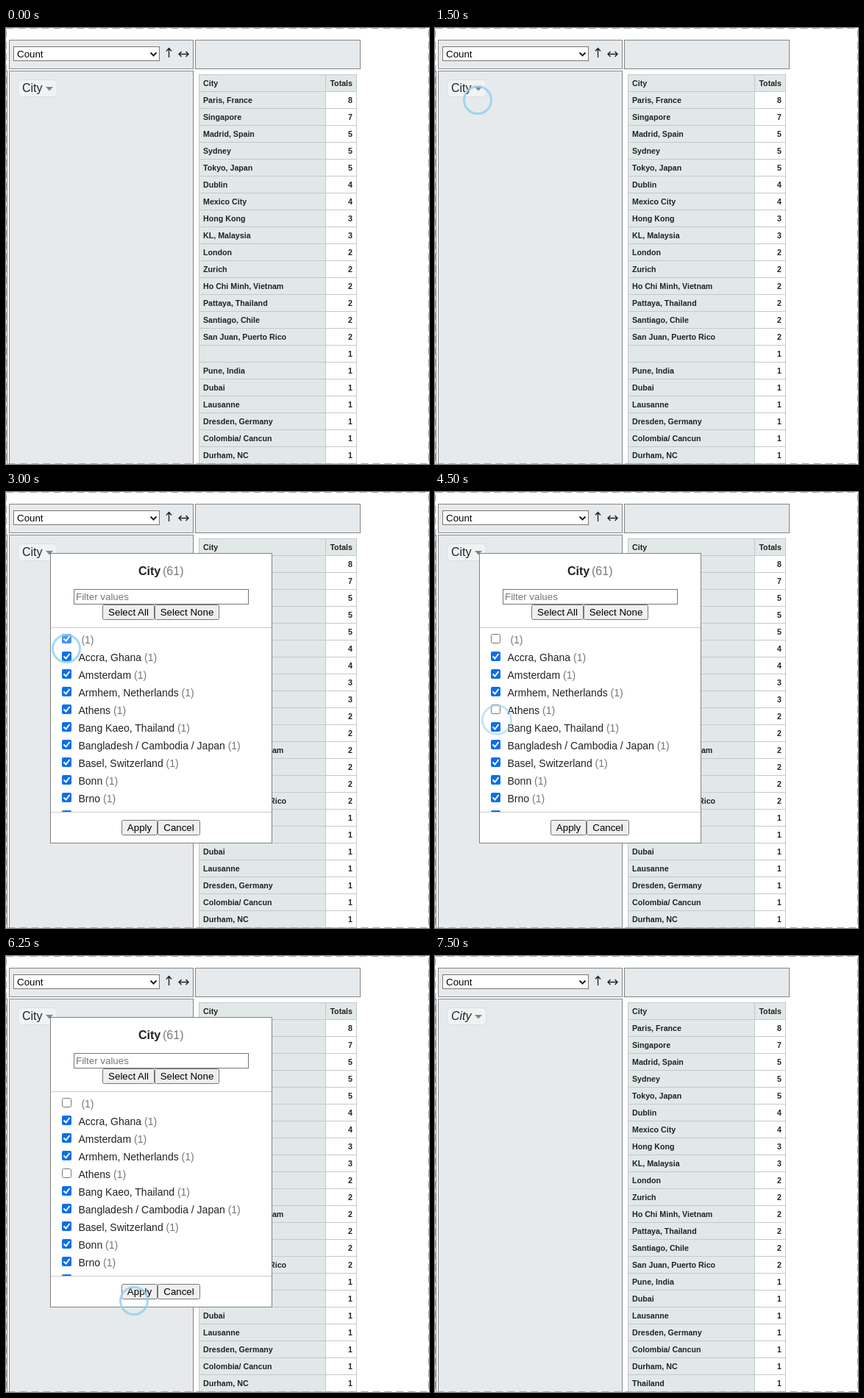
An HTML page for the animation above (8500 ms loop, 575 by 593 pixels).

```html
<!DOCTYPE html>
<html lang="en">
<head>
<meta charset="utf-8">
<title>Filtering a pivot table</title>
<style>
  html, body { margin: 0; width: 100%; height: 100%; overflow: hidden; background: #fff; }
  svg { display: block; font: 14px "Liberation Sans", Arial, sans-serif; }
  text { white-space: pre; fill: #222; }
  .cell { fill: #e6eaec; stroke: #858585; }
  .table text { font-size: 10.667px; font-weight: bold; }
  .ui { font-size: 13.333px; fill: #000; }
  .big { font-size: 16px; }
  .dim { fill: #777; }
  .end { text-anchor: end; }
  .mid { text-anchor: middle; }
  .line { fill: none; stroke: #222; stroke-width: 1.4; }
</style>
</head>
<body>
<svg id="stage" width="575" height="593" viewBox="0 0 575 593"></svg>
<script>
const STEP = 250, LOOP = 8500;
const OPEN = 1750, CLOSE = 6500;

const totals = `Paris, France|8
Singapore|7
Madrid, Spain|5
Sydney|5
Tokyo, Japan|5
Dublin|4
Mexico City|4
Hong Kong|3
KL, Malaysia|3
London|2
Zurich|2
Ho Chi Minh, Vietnam|2
Pattaya, Thailand|2
Santiago, Chile|2
San Juan, Puerto Rico|2
|1
Pune, India|1
Dubai|1
Lausanne|1
Dresden, Germany|1
Colombia/ Cancun|1
Durham, NC|1
Thailand|1`.split('\n').map(row => row.split('|'));

const choices = ['', 'Accra, Ghana', 'Amsterdam', 'Armhem, Netherlands', 'Athens',
  'Bang Kaeo, Thailand', 'Bangladesh / Cambodia / Japan', 'Basel, Switzerland', 'Bonn', 'Brno', ''];

// Times at which a choice is pressed, by row
const presses = { 0: 3000, 4: 4250 };

// Pointer position at every step, beginning with the first one
const path = [
  [225, 285], [101, 142], [74, 110], [64, 90], [62, 87],
  [58, 98], [58, 98], [58, 99], [76, 160], [88, 207],
  [83, 212], [82, 213], [82, 213], [87, 240], [95, 278],
  [93, 303], [84, 310], [84, 310], [84, 312], [92, 330],
  [112, 380], [150, 435], [183, 464], [176, 469], [174, 469]
];

const rect = (x, y, w, h, attrs = '') =>
  `<rect x="${x}" y="${y}" width="${w}" height="${h}" ${attrs}/>`;
const text = (x, y, s, cls = '') => `<text x="${x}" y="${y}" class="${cls}">${s}</text>`;
const draw = (d, attrs = 'class="line"') => `<path d="${d}" ${attrs}/>`;

function tableRow(y, name, count, fill) {
  const edge = 'stroke="#c4c9ca"';
  return rect(262.5, y, 172, 23, `fill="#e1e8e8" ${edge}`) +
    rect(434.5, y, 42, 23, `fill="${fill}" ${edge}`) +
    text(268, y + 15.5, name) + text(471, y + 15.5, count, 'end');
}

function table(rows) {
  return '<g class="table">' + tableRow(63.5, 'City', 'Totals', '#e1e8e8') +
    rows.map(([name, n], i) => tableRow(86.5 + 23 * i, name, n, '#fff')).join('') + '</g>';
}

function frame() {
  return rect(4.5, 16.5, 250, 39, 'class="cell"') +
    rect(257.5, 16.5, 224, 39, 'class="cell"') +
    rect(4.5, 58.5, 250, 560, 'class="cell"') +
    draw('M1.5 58V593', 'stroke="#858585"') +
    rect(10.5, 25.5, 198, 19, 'fill="#fff" stroke="#767676"') +
    text(15, 40, 'Count', 'ui') +
    draw('M196.5 33.5l4 4 4-4', 'class="line" style="stroke-width:2"') +
    draw('M221.5 40V28M218 31.5l3.5-4 3.5 4M235 35.5H248M238.5 32l-3.5 3.5 3.5 3.5M244.500 32l3.500 3.500-3.500 3.500') +
    rect(16.5, 70.5, 53, 23, 'rx="5" fill="#f0f2f3" stroke="#dcdfe0"') +
    `<text id="chip" x="22" y="87" class="big">City</text>` +
    draw('M54 80h10l-5 5.500z', 'fill="#858585"');
}

const button = (x, y, w, label) =>
  rect(x + .5, y + .5, w - 1, 20, 'rx="2" fill="#efefef" stroke="#767676"') +
  text(x + w / 2, y + 15, label, 'ui mid');

function checkbox(y, on, pressed) {
  if (!on) return rect(76.5, y + .5, 12, 12, 'rx="2" fill="#fff" stroke="#767676"');
  return rect(76, y, 13, 13, `rx="2" fill="${pressed ? '#4394f5' : '#0b6fec'}"`) +
    draw(`M78.500 ${y + 6.5}l3 3 5-6.500`, 'fill="none" stroke="#fff" stroke-width="2"');
}

function popup() {
  return rect(60.5, 83.5, 301, 394, 'fill="#fff" stroke="#808080"') +
    '<text x="180" y="113" class="big" font-weight="bold">City</text>' +
    text(213, 113, '(61)', 'big dim') +
    rect(92.5, 132.5, 237, 20, 'fill="#fff" stroke="#767676"') +
    text(95, 147, 'Filter values', 'ui dim') +
    button(131, 153, 71, 'Select All') + button(202, 153, 88, 'Select None') +
    draw('M61 184.5H361M61 435.5H361', 'stroke="#ccc"') +
    choices.slice(0, 10).map((name, i) =>
      `<text x="98.5" y="${206 + 24 * i}">${name} <tspan class="dim">(1)</tspan></text>`).join('') +
    '<g id="checks" clip-path="url(#list)"></g>' +
    button(157, 446, 49, 'Apply') + button(206, 446, 58, 'Cancel');
}

const $ = id => document.getElementById(id);

$('stage').innerHTML =
  `<clipPath id="list">${rect(61, 185, 300, 250)}</clipPath>` + frame() +
  `<g id="before">${table(totals.slice(0, 22))}</g>` +
  `<g id="after">${table(totals.filter(row => row[0]))}</g>` +
  `<g id="popup">${popup()}</g>` +
  rect(.5, .5, 574, 592, 'fill="none" stroke="#aaa" stroke-dasharray="10 6"') +
  '<circle id="pointer" fill="none" stroke="#8fd0ef" stroke-width="3"/>';

const show = (id, on) => $(id).setAttribute('display', on ? 'inline' : 'none');

function render(t) {
  const done = t >= CLOSE;
  show('before', !done);
  show('after', done);
  show('popup', t >= OPEN && !done);
  $('chip').setAttribute('font-style', done ? 'italic' : 'normal');

  $('checks').innerHTML = choices.map((_, i) => {
    const at = presses[i] ?? Infinity;
    return checkbox(193 + 24 * i, t < at + STEP, t >= at);
  }).join('');

  const spot = path[t / STEP - 1];
  show('pointer', spot);
  if (!spot) return;
  const fading = [OPEN, ...Object.values(presses).map(at => at + STEP)].includes(t);
  const pointer = $('pointer');
  pointer.setAttribute('cx', spot[0]);
  pointer.setAttribute('cy', spot[1]);
  pointer.setAttribute('r', fading ? 19.5 : 18.5);
  pointer.setAttribute('opacity', fading ? .55 : .8);
}

let start, last = -1;
function tick(now) {
  start ??= now;
  const t = Math.floor((now - start) % LOOP / STEP) * STEP;
  if (t !== last) render(last = t);
  requestAnimationFrame(tick);
}
render(0);
requestAnimationFrame(tick);
</script>
</body>
</html>
```
